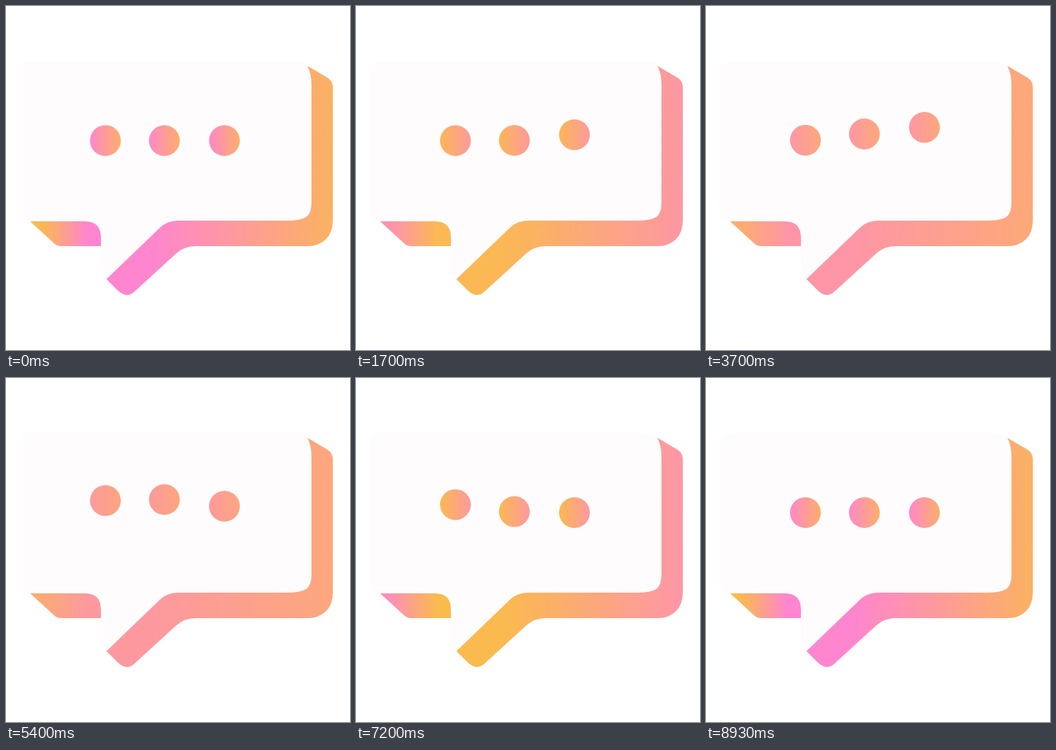
An HTML page with a canvas that plays this animation: 500 by 500 pixels, repeating every 9010 ms.

```html
<!DOCTYPE html>
<html lang="en">
<head>
<meta charset="utf-8">
<title>Typing bubble</title>
<style>
  html, body { margin: 0; width: 100%; height: 100%; overflow: hidden; background: #fff; }
  canvas { display: block; width: 500px; height: 500px; }
</style>
</head>
<body>
<canvas id="stage" width="500" height="500"></canvas>
<script>
const ctx = document.getElementById('stage').getContext('2d');

const LOOP = 9010;
const CYCLE = 4500;
const ORANGE = [250, 192, 64];
const PINK = [255, 133, 207];

const front = new Path2D(
  'M36 81H426Q438 81 440 90Q444 98 444 114V286Q444 302 436 307Q428 312 408 312' +
  'H249Q235 312 224 322L146 397Q138 392 138 384V337Q138 313 115 313' +
  'H36Q20 312 20 296V97Q20 81 36 81Z');
const rightSide = new Path2D(
  'M438 87L467 104Q475 109 475 118V312Q475 329 465 339Q455 349 438 349' +
  'H276Q259 349 247 360L188 414Q182 420 176 420Q170 420 163 414' +
  'L146 397L224 322Q235 312 249 312H408Q428 312 436 307Q444 302 444 286V114Q444 98 438 87Z');
const leftSide = new Path2D(
  'M35 313H115Q138 313 138 337V349H80Q74 349 70 345Z');

const SIDE_STOPS = [[36, 0.02], [58, 0.2], [118, 1], [212, 1], [475, 0.23]];
const DOT_X = [144.5, 230.2, 317.5];
const DOT_STOPS = [[-22, 0.95], [22, 0.3]];
const DOT_REST = 195.6;
const DOT_RISE = 20;
const PEAKS = [725, 3035];
const STAGGER = 283;
const HALF_HOP = 745;

function tint(pinkness, flip) {
  const p = pinkness + (1 - 2 * pinkness) * flip;
  return `rgb(${ORANGE.map((c, i) => Math.round(c + (PINK[i] - c) * p))})`;
}

function gradient(stops, offset, flip) {
  const first = stops[0][0];
  const span = stops[stops.length - 1][0] - first;
  const g = ctx.createLinearGradient(offset + first, 0, offset + first + span, 0);
  for (const [x, p] of stops) g.addColorStop((x - first) / span, tint(p, flip));
  return g;
}

// Smooth hop: 0 at rest, 1 at the peak.
function hop(t, index) {
  return PEAKS.reduce((sum, peak) => {
    const d = Math.abs(t - peak - index * STAGGER) / HALF_HOP;
    return d < 1 ? sum + (1 + Math.cos(Math.PI * d)) / 2 : sum;
  }, 0);
}

// Twenty poses a second, held alternately for 30 and 70 ms.
function poseTime(ms) {
  const t = ms % LOOP;
  const pose = Math.floor(t / 100) * 100 + (t % 100 < 30 ? 0 : 50);
  return Math.min(pose, 8950) % CYCLE;
}

function draw(ms) {
  const t = poseTime(ms);
  const flip = (1 - Math.cos(2 * Math.PI * t / CYCLE)) / 2;

  ctx.fillStyle = '#fff';
  ctx.fillRect(0, 0, 500, 500);
  ctx.fillStyle = '#fefcfd';
  ctx.fill(front);

  ctx.fillStyle = gradient(SIDE_STOPS, 0, flip);
  ctx.fill(rightSide);
  ctx.fill(leftSide);

  DOT_X.forEach((x, i) => {
    ctx.fillStyle = gradient(DOT_STOPS, x, flip);
    ctx.beginPath();
    ctx.arc(x, DOT_REST - DOT_RISE * hop(t, i), 22.4, 0, 2 * Math.PI);
    ctx.fill();
  });
}

const start = performance.now();
function frame() {
  draw(performance.now() - start);
  requestAnimationFrame(frame);
}
frame();
</script>
</body>
</html>
```
